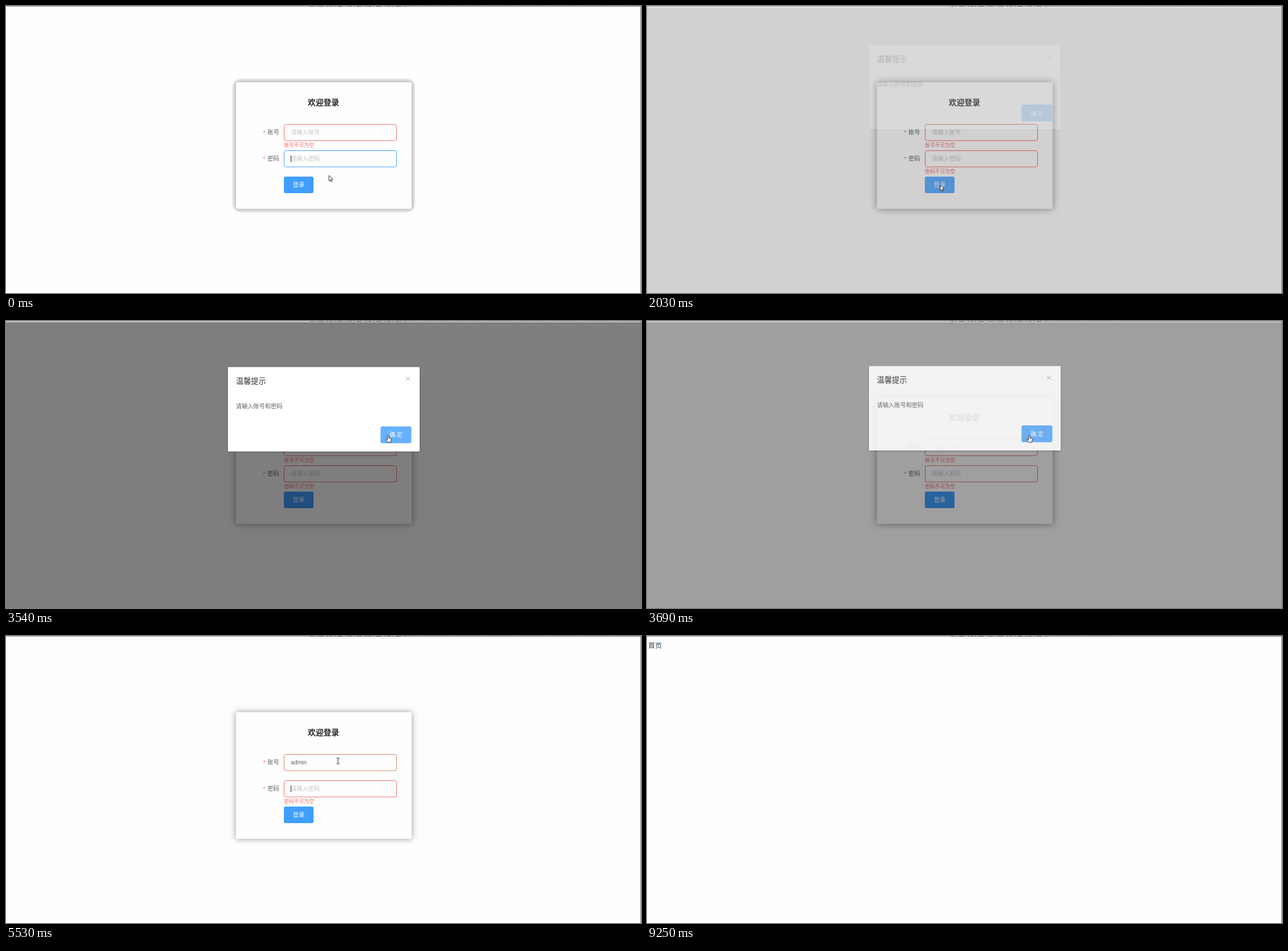
These frames come from a looping animation (1113x503 px, 9720 ms). An HTML page:

```html
<!DOCTYPE html>
<html lang="zh-CN">
<head>
<meta charset="utf-8">
<title>登录</title>
<style>
  html, body { margin: 0; width: 100%; height: 100%; overflow: hidden; background: #fefefe; }
  svg { display: block; width: 100%; height: 100%; }
  text { font: 10.2px "Liberation Sans", "Noto Sans CJK SC", "Noto Sans CJK", sans-serif; fill: #606266; }
  .cjk { font-family: "Noto Sans CJK SC", "Noto Sans CJK", sans-serif; }
  .hint { fill: #c0c4cc; }
  .error { font-size: 8.8px; fill: #f56c6c; }
  .star { fill: #f56c6c; }
  .white { fill: #fff; }
  .heading { font-size: 13.7px; font-weight: bold; fill: #222; }
  .dialog-title { font-size: 13.2px; fill: #303133; }
  .home { font-size: 11.8px; fill: #2c3e50; }
  .field { fill: #fefefe; stroke-width: 1; }
  .caret { fill: #222; }
  #cursor path { fill: #fff; stroke: #222; stroke-width: .9; stroke-linejoin: round; }
  #cursor .beam { fill: none; }
</style>
</head>
<body>
<svg viewBox="0 0 1113 503">
  <defs>
    <filter id="soft" x="-20%" y="-20%" width="140%" height="140%"><feGaussianBlur id="blur" stdDeviation="3"/></filter>
    <filter id="lift" x="-5%" y="-5%" width="110%" height="115%"><feGaussianBlur stdDeviation="1.1"/></filter>
  </defs>
  <rect id="page" width="1113" height="503"/>

  <g id="login">
    <rect id="halo" x="397" y="127" width="320" height="235" rx="16" fill="#e8e8e8"/>
    <rect x="403" y="133.5" width="308" height="222" rx="3" fill="#909399" filter="url(#soft)"/>
    <rect x="403" y="133.5" width="308" height="222" rx="3" fill="#fefefe"/>
    <text class="cjk heading" x="556.5" y="174.4" text-anchor="middle">欢迎登录</text>
    <g id="account"></g>
    <g id="password" transform="translate(0 46)"></g>
    <rect id="submit" x="487" y="299" width="52" height="29" rx="3"/>
    <text class="cjk white" x="513" y="317.4" text-anchor="middle">登录</text>
  </g>

  <text id="home" class="cjk home" x="2.3" y="20.5">首页</text>
  <rect id="shade" y="2" width="1113" height="501"/>

  <g id="dialog">
    <rect x="389" y="80" width="336" height="148" rx="1.5" opacity=".3" filter="url(#lift)"/>
    <rect x="389" y="79" width="336" height="148" rx="1.5" fill="#fff"/>
    <text class="cjk dialog-title" x="403" y="108">温馨提示</text>
    <path d="M701 96l7 7m0-7l-7 7" stroke="#909399" stroke-width=".9"/>
    <text class="cjk" x="403" y="151.4">请输入账号和密码</text>
    <rect id="confirm" x="656.5" y="183" width="54" height="29.5" rx="3"/>
    <text class="cjk white" x="683.5" y="201.7" text-anchor="middle">确 定</text>
  </g>

  <g id="frame">
    <path d="M0 .5H1113" stroke="#8a8a8a"/>
    <path d="M0 1.5H1113" stroke="#fefefe"/>
    <path d="M533 .5H700" stroke="#333" stroke-dasharray="5 3 2 4 9 6 3 2"/>
    <path d="M700 .5H1113" stroke="#555" stroke-dasharray="3 2 1 2"/>
    <path d="M1112.5 0V503" stroke="#777"/>
  </g>

  <g id="cursor">
    <path class="arrow" d="M0 0V9.6L2.3 7.5L3.8 11L5.4 10.3L3.9 7H7Z"/>
    <path class="hand" d="M-1.2 1Q0-.6 1.2 1V5L4.5 6Q5.8 6.5 5.4 8L4.4 12.6H-1L-3.8 8.2Q-4 6.4-2.6 7L-1.2 8.2Z"/>
    <path class="beam" d="M-2.5-5H2.5M0-5V5M-2.5 5H2.5"/>
  </g>
</svg>

<script>
const LOOP = 9720;
const RED = [245, 108, 108], GREEN = [103, 194, 58], BLUE = [64, 158, 255];
// Bursts of screen updates: first update, last update, number of updates.
const BURSTS = [[0, 0, 1], [150, 1080, 8], [1230, 1620, 4], [2030, 2960, 8], [3120, 4150, 8], [4710, 5680, 8],
  [5810, 6200, 4], [6630, 7590, 8], [8050, 8050, 1], [8550, 9250, 6]];
// Pointer route: time, x, y.
const ROUTE = [[0, 566, 297], [100, 566, 297], [480, 572, 306], [1000, 565, 227], [1100, 565, 227], [1600, 514, 314],
  [2400, 514, 314], [3300, 670, 200], [3720, 670, 200], [4130, 582, 219], [6560, 582, 219], [7200, 524, 322],
  [7560, 518, 313], [8450, 518, 313], [9200, 1045, 505]];
const OPEN = 1985, CLOSE = 3673, ACCOUNT_CLICK = 4700, TAB = 5490, PASSWORD_BLUR = 7450, HOME = 8050;

const $ = id => document.getElementById(id);
const clamp = v => Math.max(0, Math.min(1, v));
const mix = (a, b, p) => `rgb(${a.map((v, i) => v + (b[i] - v) * p)})`;
const show = (el, on) => el.setAttribute('display', on ? 'inline' : 'none');

function makeRow(id, label) {
  const row = $(id);
  row.innerHTML = `
    <text class="star" x="450.5" y="226">*</text>
    <text class="cjk" x="458.3" y="225.4">${label}</text>
    <rect class="field" x="487.5" y="207.5" width="197" height="28.5" rx="3"/>
    <text class="cjk hint" x="499.3" y="225.4">请输入${label}</text>
    <text class="value" x="499.3" y="225.4"></text>
    <rect class="caret" y="216" width="1" height="11.5"/>
    <text class="cjk error" x="487.2" y="247">${label}不可为空</text>`;
  const find = name => row.querySelector('.' + name);
  return { field: find('field'), hint: find('hint'), value: find('value'), caret: find('caret'), error: find('error') };
}
const account = makeRow('account', '账号'), password = makeRow('password', '密码');

function drawRow(row, value, border, error, focusAge) {
  row.value.textContent = value;
  row.field.setAttribute('stroke', border);
  show(row.hint, !value);
  show(row.error, error);
  show(row.caret, focusAge >= 0 && focusAge % 1000 < 500);
  row.caret.setAttribute('x', 499 + (value ? row.value.getComputedTextLength() : 0));
}

// CSS "ease", solved by bisection.
function ease(x) {
  if (x <= 0 || x >= 1) return clamp(x);
  const bezier = (u, a, b) => 3 * u * (1 - u) * ((1 - u) * a + u * b) + u ** 3;
  let lo = 0, hi = 1;
  for (let i = 0; i < 20; i++) {
    const mid = (lo + hi) / 2;
    if (bezier(mid, .25, .25) < x) lo = mid; else hi = mid;
  }
  return bezier(lo, .1, 1);
}

function snap(t) {
  const [start, end, count] = BURSTS.findLast(b => b[0] <= t);
  if (count === 1) return start;
  const step = (end - start) / (count - 1);
  return start + step * Math.min(count - 1, Math.floor((t - start + 20) / step));
}

function pointerAt(t) {
  const i = ROUTE.findLastIndex(p => p[0] <= t);
  const a = ROUTE[i], b = ROUTE[i + 1] || a;
  const p = b === a ? 0 : (t - a[0]) / (b[0] - a[0]);
  return [a[1] + (b[1] - a[1]) * p, a[2] + (b[2] - a[2]) * p];
}

function draw(t) {
  const atHome = t >= HOME;
  const fade = length => ease((t - OPEN) / length) * (1 - ease((t - CLOSE) / length));
  const modal = fade(300), shade = fade(200);
  const [x, y] = pointerAt(t);
  const inside = (left, top, right, bottom) => x >= left && x <= right && y >= top && y <= bottom;

  const overConfirm = modal > 0 && inside(656, 183, 711, 213);
  const free = !modal && !atHome;
  const overSubmit = free && inside(487, 299, 539, 328);
  const overField = free && (inside(487, 207, 685, 236) || inside(487, 253, 685, 282));

  $('page').setAttribute('fill', t > 3800 && !atHome ? '#fdfdfd' : '#fefefe');
  show($('login'), !atHome);
  show($('home'), atHome);
  show($('halo'), t < 2000);
  $('blur').setAttribute('stdDeviation', t < 2000 ? 3 : modal ? 7 : 5.5);

  const name = 'admin'.slice(0, Math.max(0, Math.round((t - 4710) / 139)));
  const dots = '•'.repeat(t < 5810 ? 0 : Math.min(5, Math.floor((t - 5809) / 97) + 1));
  const invalid = t >= 700 && t < PASSWORD_BLUR;
  drawRow(account, name, mix(RED, GREEN, clamp((t - TAB) / 190)), t < TAB, t < TAB ? t - ACCOUNT_CLICK : -1);
  drawRow(password, dots, mix(t < 700 ? BLUE : invalid ? RED : GREEN, RED, 0), invalid,
    t < 700 ? t : t < PASSWORD_BLUR ? t - TAB : -1);
  $('submit').setAttribute('fill', overSubmit || (t >= 1620 && t < 2400) ? '#66b1ff' : '#409eff');

  $('shade').setAttribute('opacity', shade * .5);
  $('dialog').setAttribute('opacity', modal);
  $('dialog').setAttribute('transform', `translate(0 ${1.75 - 14.6 * (1 - modal)})`);
  $('confirm').setAttribute('fill', overConfirm ? '#66b1ff' : '#409eff');

  const shape = overConfirm || overSubmit ? 'hand' : overField ? 'beam' : 'arrow';
  for (const path of $('cursor').children) show(path, path.classList.contains(shape));
  $('cursor').setAttribute('transform', `translate(${x} ${y})`);
}

const begin = performance.now();
function tick() {
  draw(snap((performance.now() - begin) % LOOP));
  requestAnimationFrame(tick);
}
tick();
</script>
</body>
</html>
```
